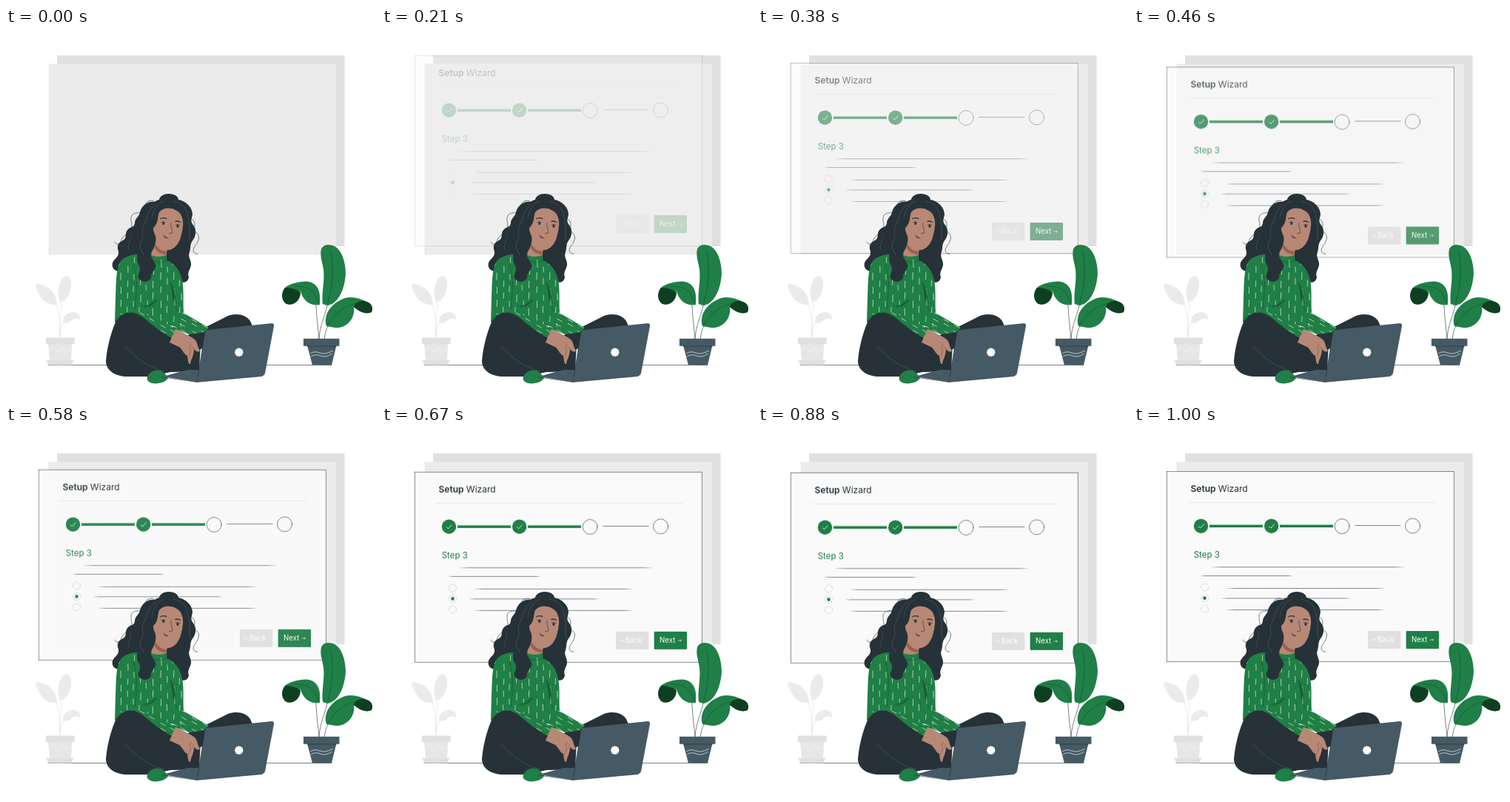
Recreate the animation shown at these times as an HTML page. Size 500 by 500 pixels, loop 1040 ms.

```html
<!DOCTYPE html>
<html lang="en">
<head>
<meta charset="utf-8">
<title>Setup wizard</title>
<style>
html, body { margin: 0; width: 100%; height: 100%; overflow: hidden; background: #fff; }
svg { display: block; width: 100vw; height: 100vh; }
text { font-family: Inter, "Open Sans", sans-serif; }
.green { fill: #1f7f47; }
.deep { fill: #0e3f21; }
.dark { fill: #263238; }
.slate { fill: #455a64; }
.skin { fill: #b78876; }
.line { fill: none; stroke: #263238; stroke-width: .6; stroke-linecap: round; }
.pale { fill: none; stroke: #52656e; stroke-width: .5; }
.fold { fill: none; stroke: #135a31; stroke-width: .7; stroke-linecap: round; }
.tick { fill: none; stroke: #fff; stroke-width: .8; }
.yarn { fill: none; stroke: #d5e5b1; stroke-width: .8; }
</style>
</head>
<body>
<svg viewBox="0 0 500 500">
  <defs>
    <linearGradient id="taper">
      <stop offset="0" stop-color="#4d595e" stop-opacity=".2"/>
      <stop offset=".05" stop-color="#4d595e"/>
      <stop offset=".95" stop-color="#4d595e"/>
      <stop offset="1" stop-color="#4d595e" stop-opacity=".2"/>
    </linearGradient>
    <path id="sweater" d="M196 307C181 304 164 305 155 315C148 326 149 345 148 365L147 398L180 398L238 404L240 384C239 365 241 350 237 337C234 325 226 317 217 314C218 310 217 308 216 307C208 310 201 309 196 307Z"/>
    <path id="sleeve" d="M147 398L153 386L174 382L196 390L231 407L222 421L188 412Z"/>
    <path id="farSleeve" d="M238 384L274 405L268 411L248 414L225 406Z"/>
    <clipPath id="torso"><use href="#sweater"/></clipPath>
    <clipPath id="arms"><use href="#sleeve"/><use href="#farSleeve"/></clipPath>
  </defs>

  <!-- backdrop -->
  <rect x="69" y="37" width="388.5" height="258" fill="#e0e0e0"/>
  <rect x="57.5" y="48.5" width="388.5" height="258" fill="#ebebeb"/>
  <path class="line" d="M57 455.500H440"/>

  <!-- pale plant -->
  <g fill="#ebebeb">
    <path d="M69 374C68 359 59 347 41 346C39 350 43 358 48 365C53 372 61 375 69 374Z"/>
    <path d="M73 371C68 358 71 342 79 336C84 333 88 338 88 347C88 358 82 369 73 371Z"/>
    <path d="M77 398C76 389 83 384 91 384C97 384 101 388 100 394C95 392 91 392 88 396C84 399 80 399 77 398Z"/>
    <path d="M73 418C75 400 71 386 68 373M73 418C71 402 75 390 75 370M73 418C73 408 75 402 78 397" fill="none" stroke="#e0e0e0" stroke-width=".6"/>
    <path fill="#e6e6e6" d="M57 427H89L88 449H59Z"/>
    <path fill="#e0e0e0" d="M54 418.500H92.500V427H54ZM54 449H91.500L88 455.500H58Z"/>
    <path d="M59 433L64 430L70 436L76 430L82 436L88 431M59 437L64 433L70 439L76 433L82 439L88 434" fill="none" stroke="#f0f0f0" stroke-width=".8"/>
  </g>

  <!-- wizard panel -->
  <g id="panel">
    <rect x="44.200" y="61.700" width="388.500" height="256.700" fill="#fafafa" stroke="#263238" stroke-width=".55"/>
    <text x="76.500" y="89.300" font-size="12" fill="#263238"><tspan font-weight="600">Setup</tspan> Wizard</text>
    <rect x="72" y="103.200" width="335" height=".8" fill="#e8e8e8"/>
    <path d="M102 135.200H174M197 135.200H269" stroke="#1f7f47" stroke-width="3.600"/>
    <path class="line" d="M299 134.500H360"/>
    <circle class="green" cx="90.500" cy="135.200" r="9.700"/>
    <circle class="green" cx="185.700" cy="135.200" r="9.700"/>
    <path class="tick" d="M87 135.500L89.500 138L94.500 132.500M182.200 135.500L184.700 138L189.700 132.500"/>
    <circle class="line" cx="281.200" cy="135.500" r="10"/>
    <circle class="line" cx="376.600" cy="134.900" r="10"/>
    <text class="green" x="80.700" y="178.300" font-size="11.500">Step 3</text>
    <g id="rules" fill="url(#taper)"></g>
    <g id="radios" fill="none" stroke="#dadada" stroke-width=".9"></g>
    <circle class="green" cx="95.500" cy="232.600" r="2.300"/>
    <rect x="316" y="277" width="44.400" height="24" rx="1" fill="#e0e0e0"/>
    <rect class="green" x="367.700" y="277" width="44.400" height="24" rx="1"/>
    <g fill="#fff" font-size="9.700">
      <text x="328.700" y="292.300">Back</text>
      <text x="375" y="292.300">Next</text>
    </g>
    <path d="M322 289H326.500M323.500 287.800L322 289L323.500 290.200M399.500 289H404.500M403 287.800L404.500 289L403 290.200" fill="none" stroke="#fff" stroke-width=".6"/>
  </g>

  <!-- green plant -->
  <g>
    <path class="line" d="M423 420C422 405 419 390 419 372M423 420C424 402 431 390 436 368M430 420C432 411 432 402 447 390"/>
    <path class="green" d="M428 373C426 358 431 342 429 326C427 314 424 308 426 299C429 292 437 292 444 295C454 300 459 317 459 332C458 351 450 373 434 375Z"/>
    <path class="green" d="M424 374C426 356 421 344 407 342.500C396 342 382 346 377 351L398 356C402 369 411 376 424 374Z"/>
    <path class="deep" d="M377 351C371 358 372 369 379 373C388 376 398 369 398 357C391 352 384 351 377 351Z"/>
    <path class="green" d="M433 403C428 386 441 371 458 365C468 362 481 366 489 371L470 378C472 392 461 406 445 405Z"/>
    <path class="deep" d="M470 377C472 369 481 367 488 370C494 372 497 378 494 384C486 388 477 383 470 377Z"/>
    <path class="fold" d="M435 371C441 350 444 325 438 301M422 371C417 355 408 348 390 349M435 401C444 385 459 374 480 370"/>
    <path class="slate" d="M407 429H446.500L440 455.500H414Z"/>
    <path class="slate" d="M402 419.700H450.500V429.700H402Z"/>
    <path d="M406.500 430H447" stroke="#263238" stroke-width=".7"/>
    <path d="M411 440Q417 436 424 439T442 436M412 444Q418 440 425 443T441 440" fill="none" stroke="#d8dfe2" stroke-width=".8"/>
  </g>

  <!-- sitting woman -->
  <g>
    <path class="dark" d="M207 235C206 228 212 224 220 224C228 224 233 228 233 232C244 234 252 243 252 252C251 258 249 260 252 265C258 272 257 280 253 286C248 292 250 297 248 303C245 309 251 314 250 321C248 328 245 330 247 337C246 343 241 345 236 343L214 320L190 320L158 328C148 331 142 325 144 317C147 311 153 309 152 302C149 294 152 290 158 287C164 284 160 278 164 273C168 268 173 270 174 264C174 257 180 255 181 249C183 240 192 233 201 235Z"/>
    <path class="line" d="M201 235C197 231 188 234 188 240C188 249 181 250 176 250C168 251 168 258 170 265C170 276 160 278 156 286C154 294 148 293 147 289"/>
    <path class="line" d="M251 258C260 265 250 272 258 277C264 283 258 291 255 295C251 301 254 306 259 305"/>

    <!-- far leg and sleeve -->
    <path class="dark" d="M235 420L272 403L300 389C312 385 324 387 330 396L334 405L270 432L240 440Z"/>
    <use class="green" href="#farSleeve"/>
    <path class="skin" d="M199 281L196 309C200 318 211 320 216 313L218 298Z"/>
    <path fill="#9b5f50" d="M202 292C206 299 211 302 217 302L216 306C209 306 203 302 201 297Z"/>
    <use class="green" href="#sweater"/>
    <g id="knit" class="yarn" clip-path="url(#torso)"></g>
    <path class="fold" d="M171 318C178 330 177 357 174 379M204 368C197 376 191 378 186 377M224 348C231 361 227 373 231 383M196 313C203 317 211 318 217 314"/>
    <path fill="#176238" d="M221 342C228 350 231 359 226 372C225 362 224 352 221 342ZM204 366C201 374 193 378 185 376C192 375 199 371 204 366Z"/>

    <!-- near leg and foot -->
    <use class="green" href="#sleeve"/>
    <g id="cuffs" class="yarn" clip-path="url(#arms)"></g>
    <path class="dark" d="M135 451C136 435 141 414 147 400C153 386 164 383 174 385C185 389 194 399 205 407L222 418L263 426L261 464L222 465L195 471H165C147 471 136 463 135 451Z"/>
    <path class="pale" d="M160 429C175 445 190 458 214 464"/>
    <path class="green" d="M191 471C194 464 202 461 209 463C213 465 217 469 219 473C216 478 210 480 202 480.500C194 480 189 477 191 471Z"/>

    <!-- laptop -->
    <path class="slate" d="M212 471L245 462L262 462L258 478.500Z"/>
    <path class="line" d="M212 472L258 478.500"/>
    <path class="slate" d="M269 410Q270 408 272 408L359 399Q362.500 399 362 403L350 467Q349 470 346 470.500L258 478.500Z"/>
    <path class="line" d="M269 410L258 478.500L346 470.500"/>
    <circle cx="314.800" cy="438.200" r="5.600" fill="#fff"/>

    <!-- hand -->
    <path class="skin" d="M229 407C238 411 248 416 254 420C259 424 258 430 262 436C260 439 257 437 254 434C254 443 250 447 249 454C246 455 246 448 245 443C241 442 239 435 234 431L221 425Z"/>
    <path d="M246 444C250 441 250 434 247 429M254 434L249 427" fill="none" stroke="#8f5949" stroke-width=".7"/>

    <!-- face -->
    <path class="skin" d="M206 248C214 240 230 240 238 252C241 263 238 278 235 286C230 298 220 304 210 297C203 292 201 284 201 279C196 276 196 268 200 266C204 266 205 261 206 248Z"/>
    <path class="dark" d="M202 234C214 228 235 230 243 243C246 252 241 257 240 264C238 257 238 250 229 246C221 242 212 243 207 249C204 257 205 264 201 268C197 270 200 276 202 281C204 291 199 299 196 304C194 311 204 317 202 324C199 330 195 333 196 338C192 345 183 344 179 338C177 333 184 328 180 321C174 313 180 306 175 299L180 255Z"/>
    <path class="pale" d="M202 238C191 246 192 255 187 264C181 273 188 279 183 288C178 296 184 301 186 307M213 234C204 237 199 247 197 257M226 234C239 236 246 246 246 257C251 268 246 275 249 286M168 278C172 286 162 292 166 300"/>
    <path d="M208.500 258Q212 255.500 217 257.500M228.500 261.500Q232.500 260 236 262.500" fill="none" stroke="#263238" stroke-width="1.400"/>
    <g class="dark"><ellipse cx="212.800" cy="264" rx="1.600" ry="2"/><ellipse cx="232" cy="267.700" rx="1.600" ry="2"/></g>
    <path class="line" d="M209.500 262.500Q212 260.500 215 262.500M229 266Q232 264 235 266.500"/>
    <path d="M223 263C222 269 225 272 225 277L220.500 277.500" class="line"/>
    <path fill="#672e28" d="M212.500 278C213.500 281 216 283.500 219.500 283C218 285 215 284.500 213.500 282Z"/>
  </g>
</svg>
<script>
const $ = id => document.getElementById(id);
const add = (id, markup) => $(id).insertAdjacentHTML('beforeend', markup);

// Text rules on the panel: left, right, y
[[105, 365, 190.800], [90, 214, 202.600], [125, 338, 219.300], [118, 293, 232.900], [125, 338, 248.500]]
  .forEach(([a, b, y]) => add('rules', `<rect x="${a}" y="${y - .35}" width="${b - a}" height=".7"/>`));
[218, 232.600, 247].forEach(y => add('radios', `<circle cx="95.500" cy="${y}" r="5"/>`));

// Knitted dashes
let seed = 7;
const rand = () => (seed = seed * 16807 % 2147483647) / 2147483647;
const dash = (x, y, dx, dy) => `M${x.toFixed(1)} ${y.toFixed(1)}l${dx.toFixed(1)} ${dy.toFixed(1)}`;
let knit = '', cuffs = '';
for (let col = 0; col < 10; col++) {
  for (let row = 0; row < 6; row++) {
    const x = 153 + col * 9 + rand() * 3;
    const y = 309 + row * 19 + (col % 2) * 9 + rand() * 5;
    knit += dash(x, y, (rand() - .5) * 1.500, 7 + rand() * 4);
  }
}
for (let i = 0; i < 36; i++) {
  const x = 150 + i % 9 * 14 + rand() * 4;
  const y = 383 + Math.floor(i / 9) * 8 + rand() * 3;
  cuffs += dash(x, y, 7, 4);
}
add('knit', `<path d="${knit}"/>`);
add('cuffs', `<path d="${cuffs}"/>`);

// Panel motion: time, vertical shift, opacity
const LOOP = 1040;
const poses = [
  [125, -29, .04], [210, -24, .2], [380, -14, .54], [460, -8.600, .73], [580, -2.200, .93],
  [630, -.4, .98], [670, .8, 1], [750, 2, 1], [830, 2.200, 1], [920, 1.400, 1], [1000, 0, 1]
];
function poseAt(t) {
  if (t < poses[0][0]) return [-30, 0];
  const i = Math.max(1, poses.findIndex(p => p[0] >= t));
  const a = poses[i - 1], b = poses[i];
  const u = (t - a[0]) / (b[0] - a[0]);
  return [1, 2].map(k => a[k] + (b[k] - a[k]) * u);
}
const frames = [];
for (let k = 0; k <= 24; k++) {
  const t = Math.round(k * 100 / 24) * 10;
  const [y, opacity] = poseAt(t);
  frames.push({ offset: t / LOOP, transform: `translateY(${y}px)`, opacity, easing: 'step-end' });
}
frames.push({ ...frames[24], offset: 1 });
$('panel').animate(frames, { duration: LOOP, iterations: Infinity }).startTime = 0;
</script>
</body>
</html>
```
